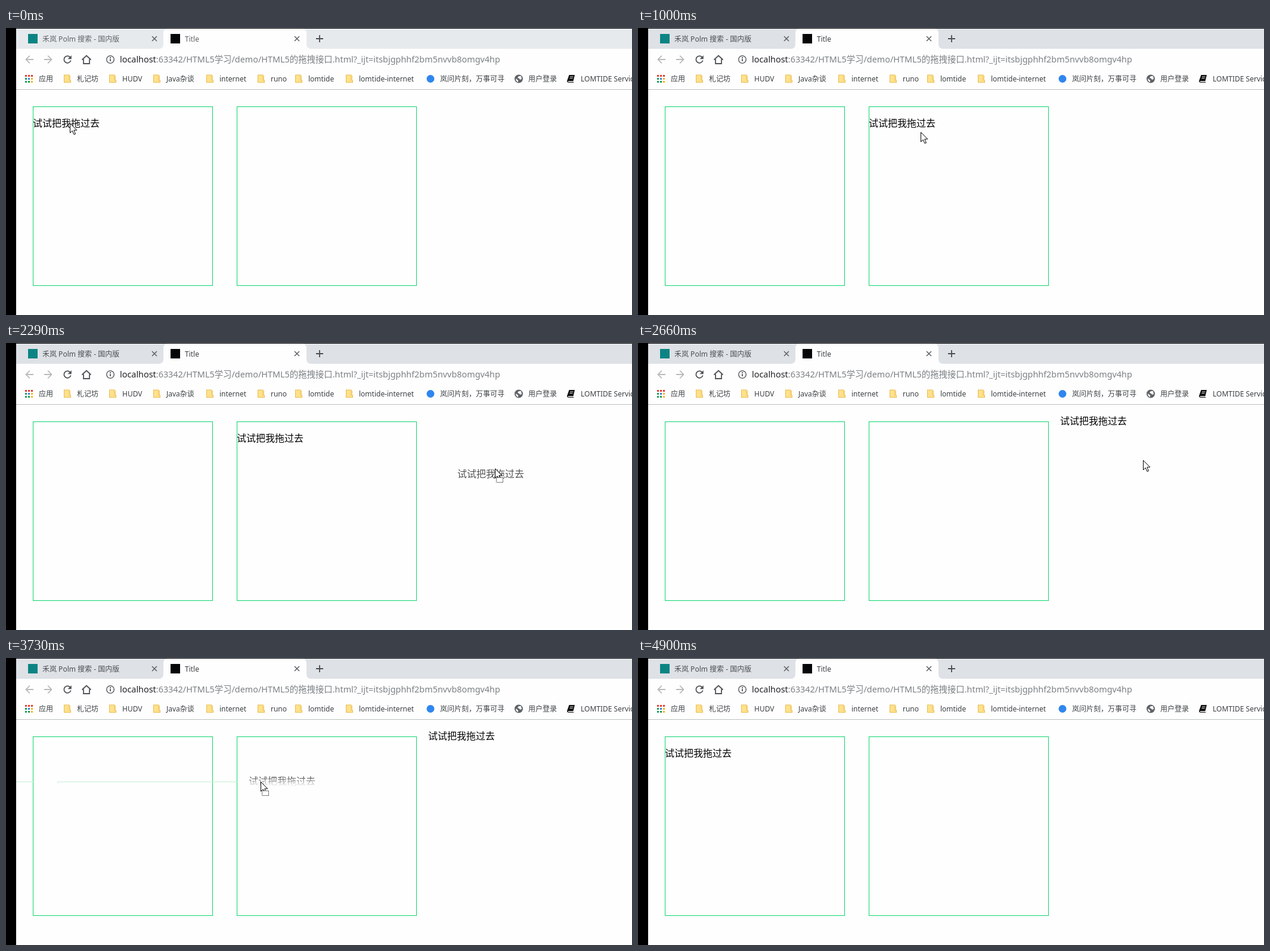
Recreate the animation shown at these times as an HTML page with a canvas. Size 1050 by 483 pixels, loop 6030 ms.

```html
<!DOCTYPE html>
<html lang="zh-CN">
<head>
<meta charset="utf-8">
<title>Drag and drop</title>
<style>
  html, body { margin: 0; width: 100%; height: 100%; overflow: hidden; background: #fefefe; }
  canvas { display: block; width: 1050px; height: 483px; }
</style>
</head>
<body>
<canvas id="stage" width="1050" height="483"></canvas>
<script>
const ctx = document.getElementById('stage').getContext('2d');
const LOOP = 6030, BEAT = 120, POINTER_GONE = 4900;
const FONT = '"Noto Sans", "Noto Sans CJK SC", "Noto Sans CJK", sans-serif';
const INK = '#5f6368', DARK = '#3c4043', PAGE = '#fefefe', GREEN = '#0cd66c';
const LABEL = '试试把我拖过去';

// Left edge and vertical centre of the label in each resting place.
const FIRST = { x: 45, y: 160 }, SECOND = { x: 387, y: 160 }, OUTSIDE = { x: 708, y: 131 };
const START = { x: 107, y: 160 };

// Each move bends from the previous end towards `to`, easing out by a power.
// Drags also have a drop time; their label trails by a fraction of a beat.
const MOVES = [
  { at: 150, beats: 6, power: 2.15, bend: { x: 290, y: 178 }, to: { x: 474, y: 175 },
    drop: 1000, home: FIRST, dest: SECOND, trail: .09 },
  { at: 1150, beats: 4, power: 2, to: { x: 431, y: 157 } },
  { at: 1930, beats: 5, power: 2.23, bend: { x: 760, y: 263 }, to: { x: 847, y: 197 },
    drop: 2660, home: SECOND, dest: OUTSIDE, trail: .45 },
  { at: 2810, beats: 4, power: 2.5, to: { x: 768, y: 129 } },
  { at: 3480, beats: 6, power: 3.06, bend: { x: 520, y: 232 }, to: { x: 294, y: 201 },
    drop: 4390, home: OUTSIDE, dest: FIRST, trail: .36, wide: true },
  { at: 4660, beats: 1, power: 1, to: { x: 317, y: 221 } }
];
MOVES.forEach((move, i) => move.start = i ? MOVES[i - 1].to : START);

function rect(x, y, w, h, color) {
  ctx.fillStyle = color;
  ctx.fillRect(x, y, w, h);
}

function disc(x, y, r, color) {
  ctx.fillStyle = color;
  ctx.beginPath();
  ctx.arc(x, y, r, 0, Math.PI * 2);
  ctx.fill();
}

function stroke(path, color, width = 1.8) {
  ctx.strokeStyle = color;
  ctx.lineWidth = width;
  ctx.stroke(new Path2D(path));
}

function fill(path, color) {
  ctx.fillStyle = color;
  ctx.fill(new Path2D(path));
}

function text(str, x, y, size, color) {
  ctx.font = `${size}px ${FONT}`;
  ctx.fillStyle = color;
  ctx.fillText(str, x, y);
  return ctx.measureText(str).width;
}

function cross(x, y) {
  stroke(`M${x - 4} ${y - 4}l8 8m0 -8l-8 8`, INK, 1.6);
}

function tabs(active) {
  rect(17, 1, 1033, 34, active ? '#dee1e6' : '#e7eaed');
  fill('M256 35q8 0 8-8V9q0-8 8-8H496q8 0 8 8V27q0 8 8 8z', PAGE);
  rect(37, 10, 16, 16, '#0c8484');
  text('禾岚 Polm 搜索 - 国内版', 61, 23, 12, active ? '#4a4e52' : INK);
  cross(249, 18);
  rect(276, 10, 16, 16, '#050708');
  text('Title', 300, 23, 12, active ? DARK : INK);
  cross(488, 18);
  stroke('M520 18h12m-6 -6v12', '#4a4e52');
}

function toolbar() {
  stroke('M46 53H33.5m6.3 -6.3l-6.3 6.3 6.3 6.3', '#b9bbbd');
  stroke('M64 53H76.5m-6.3 -6.3l6.3 6.3 -6.3 6.3', '#b9bbbd');
  stroke('M107.5 49.2A5.8 5.8 0 1 0 108.7 54.5', '#505458');
  fill('M109.8 46v6.3h-6.3z', '#505458');
  stroke('M127.5 53.5L135 46.5 142.5 53.5M130 52.5V60H140V52.5', '#505458');
  disc(175, 53, 7, INK);
  disc(175, 53, 5.5, PAGE);
  rect(174, 52, 2, 4, INK);
  rect(174, 49, 2, 2, INK);
  const host = text('localhost', 191, 58, 14.4, '#202124');
  text(':63342/HTML5学习/demo/HTML5的拖拽接口.html?_ijt=itsbjgphhf2bm5nvvb8omgv4hp',
    191 + host, 58, 14.4, '#7b8084');
}

function folder(x) {
  fill(`M${x} 78.5h9.5v9h2.5v4.5h-12z`, '#e9bd51');
  fill(`M${x + 1} 79.5h7.5v9h2.5v2.5h-10z`, '#ffe18c');
  rect(x + 9.5, 80, 1.5, 7.5, '#f3cc68');
}

function appGrid(x) {
  const red = '#e5372b', green = '#139f5a', blue = '#3b7de0', amber = '#f6b51d';
  [red, red, red, green, blue, amber, green, green, amber].forEach((color, i) =>
    rect(x - 1 + i % 3 * 5, 79 + Math.floor(i / 3) * 5, 3, 3, color));
}

function dot(x) {
  disc(x + 6, 85.5, 6.5, '#2f86ee');
}

function globe(x) {
  disc(x + 6, 85.5, 7, INK);
  fill(`M${x + 1} 85l4 3v3q-4 -1-4-6z`, PAGE);
  fill(`M${x + 6} 81h4l1 5-3 1-1 -2-3-1z`, PAGE);
}

function book(x) {
  fill(`M${x + 2.5} 79h9.5l-2.5 10.5h-8.500q-1 1 0 1.500h9l.5 1H${x + 1}q-2.500-.8-2-3z`, '#111');
  stroke(`M${x + 4} 82h5.5m-6 2.500h5`, '#ddd', 1);
}

const BOOKMARKS = [
  [appGrid, 55, '应用'], [folder, 119, '札记坊'], [folder, 195, 'HUDV'],
  [folder, 269, 'Java杂谈'], [folder, 358, 'internet'], [folder, 444, 'runo'],
  [folder, 507, 'lomtide'], [folder, 592, 'lomtide-internet'],
  [dot, 728, '岚问片刻，万事可寻'], [globe, 876, '用户登录'], [book, 964, 'LOMTIDE Service']
];

function bookmarks() {
  for (const [icon, x, name] of BOOKMARKS) {
    icon(x - 22);
    text(name, x, 90, 12, DARK);
  }
  rect(17, 103, 1033, 1, '#b9c1be');
}

function dropBox(x) {
  ctx.strokeStyle = GREEN;
  ctx.lineWidth = 1;
  ctx.strokeRect(x + .5, 132.5, 301, 301);
}

function fade(top, bottom, rgb, alpha) {
  const g = ctx.createLinearGradient(0, top, 0, bottom);
  g.addColorStop(0, `rgba(${rgb},${alpha})`);
  g.addColorStop(1, `rgba(${rgb},0)`);
  return g;
}

function label({ x, y }, color) {
  text(LABEL, x, y + 6, 16, color);
}

// A wide drag image also carries the fading top edges of both boxes.
function ghost(drag, tip) {
  const dx = tip.x - drag.start.x, dy = tip.y - drag.start.y;
  const spot = { x: drag.home.x + dx, y: drag.home.y + dy };
  if (!drag.wide) return label(spot, 'rgba(0,0,0,.68)');
  ctx.save();
  ctx.beginPath();
  ctx.rect(17, 104, 1033, 379);
  ctx.clip();
  const top = 132 + dy;
  for (const x of [45 + dx, 387 + dx]) {
    rect(x, top, 302, 1, '#c6efd2');
    for (const side of [x, x + 301]) {
      rect(side, top + 1, 1, 5, fade(top, top + 6, '12,214,108', .22));
    }
  }
  label(spot, fade(spot.y - 9, spot.y + 9, '0,0,0', .78));
  ctx.restore();
}

function pointer({ x, y }, dragging) {
  ctx.save();
  ctx.translate(x + .5, y + .5);
  const arrow = 'M0 0V16L3.7 12.5 6.5 18.7 9 17.7 6.3 11.5H11.3z';
  fill(arrow, '#fff');
  stroke(arrow, '#000', 1);
  if (dragging) {
    fill('M2 15h11v8h-11z', '#fff');
    ctx.setLineDash([1, 1]);
    ctx.lineDashOffset = .5;
    stroke('M2 15h11v8h-11z', '#000', 1);
  }
  ctx.restore();
}

function along({ start, to, bend, beats, power }, beat) {
  const u = Math.min(1, Math.max(0, beat / beats));
  const p = 1 - (1 - u) ** power, q = 1 - p;
  const mix = k => {
    const mid = bend ? bend[k] : (start[k] + to[k]) / 2;
    return Math.round(q * q * start[k] + 2 * p * q * mid + p * p * to[k]);
  };
  return { x: mix('x'), y: mix('y') };
}

function draw(t) {
  rect(0, 0, 1050, 483, PAGE);
  tabs(t >= MOVES[0].at);
  toolbar();
  bookmarks();
  dropBox(45);
  dropBox(387);

  const dropped = MOVES.findLast(m => t >= m.drop);
  label(dropped ? dropped.dest : FIRST, '#000');

  const move = MOVES.findLast(m => t >= m.at) || MOVES[0];
  const beat = Math.floor((t - move.at) / BEAT);
  const dragging = t >= move.at && t < move.drop;
  if (dragging) ghost(move, along(move, beat - move.trail));
  if (t < POINTER_GONE) pointer(along(move, beat), dragging);

  rect(0, 0, 17, 483, '#000');
  rect(0, 0, 1050, 1, '#000');
}

const begin = performance.now();
function frame() {
  draw((performance.now() - begin) % LOOP);
  requestAnimationFrame(frame);
}
frame();
</script>
</body>
</html>
```
